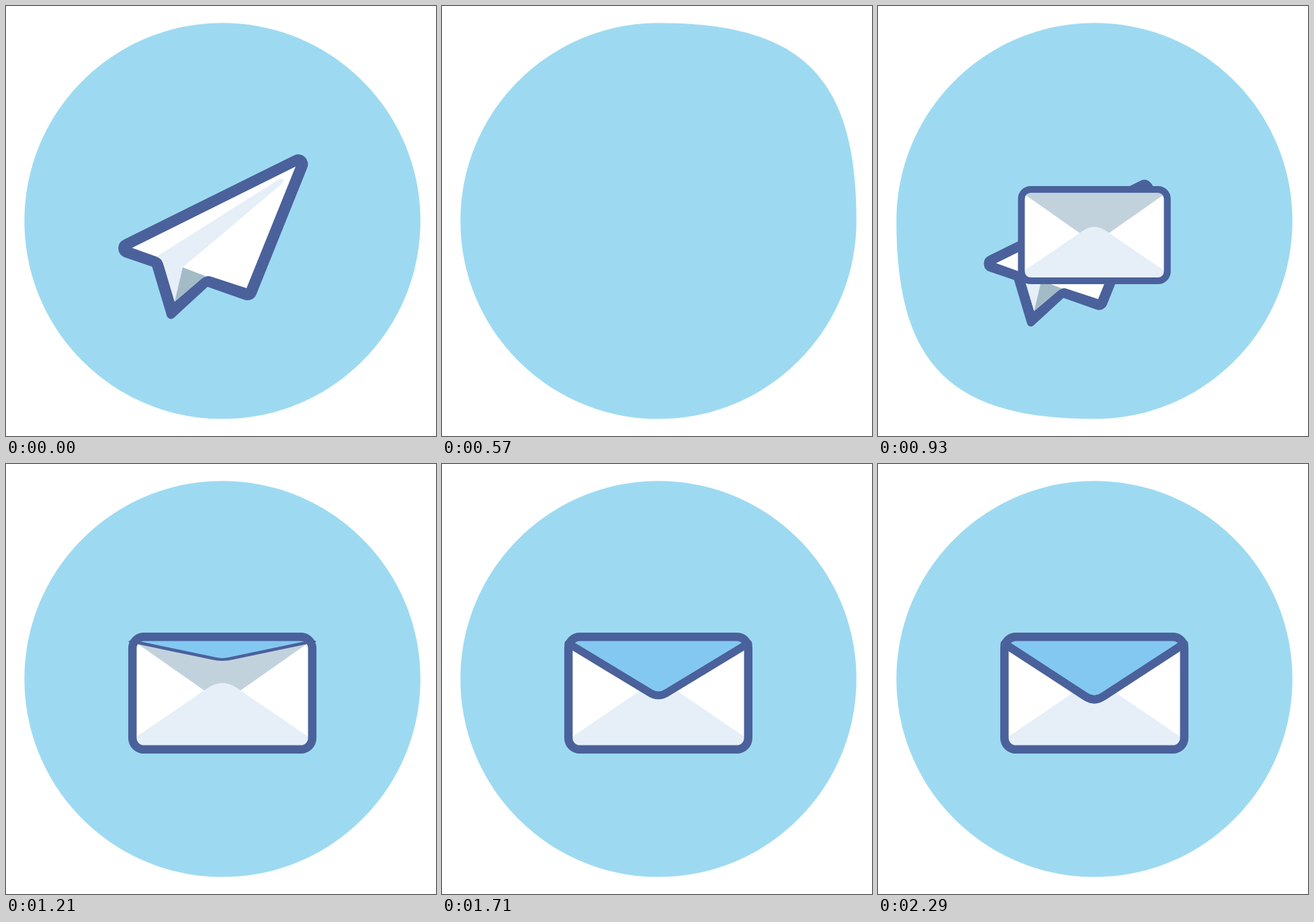
An HTML page that plays this animation: 640 px wide and 640 px high, repeating every 2.87 s.

```html
<!DOCTYPE html>
<html lang="en">
<head>
<meta charset="utf-8">
<title>Sending a letter</title>
<style>
  html, body { margin: 0; width: 100%; height: 100%; overflow: hidden; background: #fff; }
  svg { display: block; width: 100vw; height: 100vh; }
</style>
</head>
<body>
<svg viewBox="0 0 640 640">
  <defs>
    <clipPath id="stage"><rect x="6" width="628" height="640"/></clipPath>
    <clipPath id="paper"><rect x="188.2" y="257.2" width="267.6" height="167.6" rx="17"/></clipPath>
  </defs>
  <path id="blob" fill="#9ddaf1"/>
  <g clip-path="url(#stage)">
    <g id="plane">
      <path fill="#4a619b" d="M175.8 347.4L428.8 222.2A14.5 14.5 0 0 1 448.3 241L372.5 429.5A14.3 14.3 0 0 1 354 437L300 418L250 464A6.5 6.5 0 0 1 239.3 461L217.5 388L176.5 374A14.3 14.3 0 0 1 175.8 347.4Z"/>
      <path fill="#fff" d="M187.5 360L431 239L358 420L306 403Q299 400 292 405L251 440L234 383Q231 375 224 373Z"/>
      <path fill="#e6eff7" d="M224 373L406 258Q411 256 413 260Q413 263 409 266L263 389L251 440L234 383Q231 375 224 373Z"/>
      <path fill="#a3bbc6" d="M263 389L297 402Q294 403 292 405L251 440Z"/>
    </g>
  </g>
  <g id="envelope">
    <g clip-path="url(#paper)">
      <path fill="#fff" d="M188 257H456V425H188Z"/>
      <path fill="#c2d2dd" d="M188 257H456V262L322 356L188 262Z"/>
      <path fill="#e6eff7" d="M188 410L301 333Q322 319 343 333L456 410V425H188Z"/>
      <path class="flap" fill="#83c8f1" d="M188.5 257V267.6L309 346Q322 355 335 346L455.5 267.6V257Z"/>
    </g>
    <g fill="none" stroke="#4a619b">
      <rect x="188.2" y="257.2" width="267.6" height="167.6" rx="17" stroke-width="12.5"/>
      <path class="flap" stroke-width="12.3" stroke-linecap="round" d="M188.5 267.6L309 346Q322 355 335 346L455.5 267.6"/>
    </g>
  </g>
</svg>
<script>
  const LOOP = 2870, FPS = 14, LAST_STEP = 32;
  const CX = 322.1, CY = 319.9, R = 294.7, ROUND = 0.5523;
  const byId = id => document.getElementById(id);
  const blob = byId('blob'), plane = byId('plane'), envelope = byId('envelope');
  const flaps = document.querySelectorAll('.flap');

  const progress = (step, from, to) => Math.min(1, Math.max(0, (step - from) / (to - from)));
  const easeOut = (p, power) => 1 - Math.pow(1 - p, power);
  const backOut = p => 1 + 2.66 * Math.pow(p - 1, 3) + 1.66 * (p - 1) ** 2;

  function show(node, visible, transform) {
    node.style.display = visible ? '' : 'none';
    node.setAttribute('transform', transform);
  }

  const scaleAt = (x, y, sx, sy) =>
    `translate(${x} ${y}) scale(${sx} ${sy}) translate(${-x} ${-y})`;

  // Rises quickly, then relaxes along a half cosine.
  function bulge(step, start, peak, end) {
    const rise = Math.sin(progress(step, start, peak) * Math.PI / 2);
    const fall = (1 + Math.cos(progress(step, peak, end) * Math.PI)) / 2;
    return 0.31 * rise * fall;
  }

  // A circle of four curves; longer handles push a corner outwards.
  function blobPath(upperRight, lowerLeft) {
    const quarter = (x0, y0, x1, y1, k) => {
      const points = [[x0 + x1 * k, y0 + y1 * k], [x1 + x0 * k, y1 + y0 * k], [x1, y1]];
      return 'C' + points.map(([x, y]) => `${CX + x * R} ${CY + y * R}`).join(' ');
    };
    return `M${CX} ${CY - R}` +
      quarter(0, -1, 1, 0, ROUND + upperRight) +
      quarter(1, 0, 0, 1, ROUND) +
      quarter(0, 1, -1, 0, ROUND + lowerLeft) +
      quarter(-1, 0, 0, -1, ROUND) + 'Z';
  }

  function draw(time) {
    const step = Math.min(LAST_STEP, Math.floor((time + 5) * FPS / 1000));

    blob.setAttribute('d', blobPath(bulge(step, 2, 5, 11.5), bulge(step, 8, 10, 16.5)));

    const shift = step < 8
      ? 320 * (step / 4) ** 2
      : -640 * Math.pow(1 - progress(step, 8, 16), 3.31);
    const size = 1 - Math.pow(progress(step, 12, 16), 1.6);
    show(plane, size > 0,
      `translate(${shift} ${-shift * 0.99}) ${scaleAt(308.5, 343, size, size)}`);

    const grow = backOut(progress(step, 12, 16));
    show(envelope, step > 12, scaleAt(322, 341, grow, grow));

    const fold = easeOut(progress(step, 15.3, LAST_STEP), 3.62);
    flaps.forEach(flap => show(flap, fold > 0, scaleAt(322, 262.6, 1, fold)));
  }

  const begin = performance.now();
  function tick() {
    draw((performance.now() - begin) % LOOP);
    requestAnimationFrame(tick);
  }
  tick();
</script>
</body>
</html>
```
